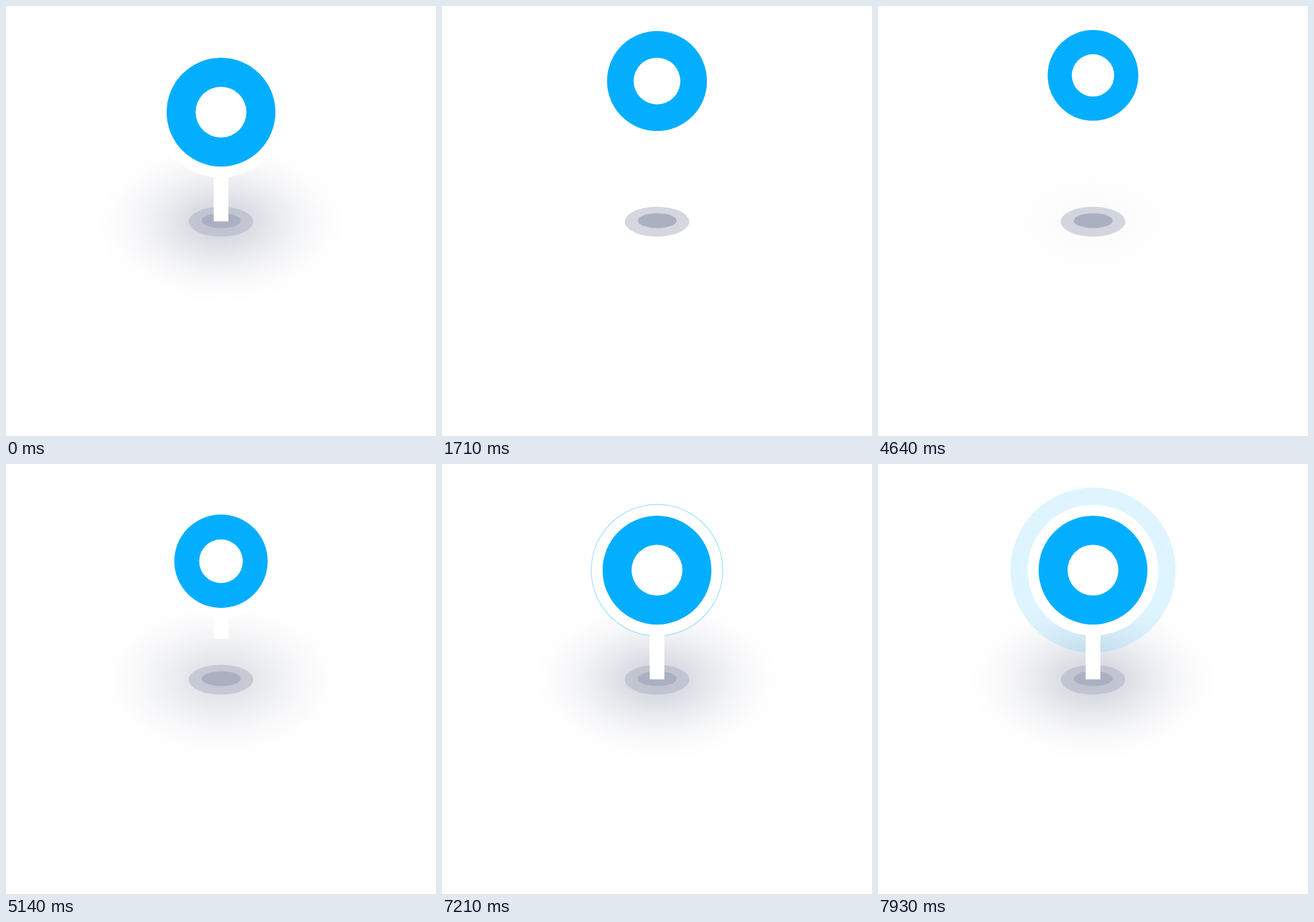
These frames come from a looping animation (640 px wide and 640 px high, 8 s). An HTML page without scripts:

```html
<!DOCTYPE html>
<html lang="en">
<head>
<meta charset="utf-8">
<title>Map pin</title>
<style>
  @property --f { syntax: '<number>'; inherits: true; initial-value: 0; }

  html, body { margin: 0; width: 100%; height: 100%; overflow: hidden; background: #fff; }

  /* --f is a clock at 14 ticks per second; every pose below derives from it */
  svg {
    display: block; width: 100%; height: 100%;
    animation: clock 8s steps(112) -6ms infinite;

    /* pin rises */
    --u: clamp(0, (var(--f) - 16.2) / 21.8, 1);
    --v: calc(1 - var(--u));
    --v3: calc(var(--v) * var(--v) * var(--v));
    --rise: calc(1 - var(--v3) * var(--v3) * var(--v) * (1 + 7 * var(--u)));

    /* pin drops */
    --d: clamp(0, (var(--f) - 64.5) / 17.5, 1);
    --e: calc(1 - var(--d) * var(--d));
    --e3: calc(var(--e) * var(--e) * var(--e));
    --drop: calc(1 - var(--e3) * var(--e3) * var(--e));
    --y: calc(158 - 55 * (var(--rise) - var(--drop)));

    /* head shrinks, then grows back */
    --s: clamp(0, (var(--f) - 16.3) / 21.7, 1);
    --t: calc(1 - var(--s) * var(--s));
    --shrink: calc(1 - var(--t) * var(--t) * var(--t) * var(--t) * var(--t));
    --g: clamp(0, (var(--f) - 68.8) / 13.2, 1);
    --grow: calc(var(--g) * var(--g) * (3 - 2 * var(--g)));
    --r: calc(81 - 13.5 * (var(--shrink) - var(--grow)));

    /* lower end of the stem */
    --a: clamp(0, (var(--f) - 16) / 12, 1);
    --b: clamp(0, (var(--f) - 63.5) / 18, 1);
    --pull: calc(var(--a) * var(--a) * (3 - 2 * var(--a)));
    --push: calc(var(--b) * var(--b) * (3 - 2 * var(--b)));
    --foot: calc(320.5 - 111.5 * (var(--pull) - var(--push)));

    --shade: calc(1 - clamp(0, (var(--f) - 16) / 7, 1) + clamp(0, (var(--f) - 64) / 11, 1));
    --wave: calc(var(--f) - 101);
  }
  @keyframes clock { from { --f: 0; } to { --f: 112; } }

  .shadow { opacity: var(--shade); }
  .head { transform: translateY(calc(var(--y) * 1px)); }
  .wave {
    r: calc(max(0, 98.5 + 2.45 * var(--wave)) * 1px);
    opacity: clamp(0, .4 - .027 * var(--wave), .4);
  }
  .rim  { r: calc(var(--r) * 1.202px); }
  .disc { r: calc(var(--r) * 1px); }
  .hole { r: calc(var(--r) * .467px); }
  .stem {
    y: calc(var(--y) * 1px);
    height: calc((var(--foot) - var(--y)) * 1px);
  }
  .white { fill: #fff; }
  .blue { fill: #04aeff; }
  .spot { fill: #abafc2; }
</style>
</head>
<body>
<svg viewBox="0 0 640 640">
  <defs>
    <radialGradient id="soft">
      <stop offset="0" stop-color="#7a819b" stop-opacity=".34"/>
      <stop offset=".2" stop-color="#7a819b" stop-opacity=".285"/>
      <stop offset=".42" stop-color="#7a819b" stop-opacity=".17"/>
      <stop offset=".63" stop-color="#7a819b" stop-opacity=".073"/>
      <stop offset=".84" stop-color="#7a819b" stop-opacity=".018"/>
      <stop offset="1" stop-color="#7a819b" stop-opacity="0"/>
    </radialGradient>
  </defs>

  <ellipse class="shadow" cx="320" cy="321" rx="192" ry="124" fill="url(#soft)"/>
  <ellipse class="spot" cx="320" cy="321" rx="48" ry="22.3" opacity=".5"/>
  <ellipse class="spot" cx="320.3" cy="319.5" rx="29" ry="11"/>

  <g class="head"><circle class="wave blue" cx="320"/></g>
  <rect class="stem white" x="309" width="22"/>
  <g class="head">
    <circle class="rim white" cx="320"/>
    <circle class="disc blue" cx="320"/>
    <circle class="hole white" cx="320"/>
  </g>
</svg>
</body>
</html>
```
